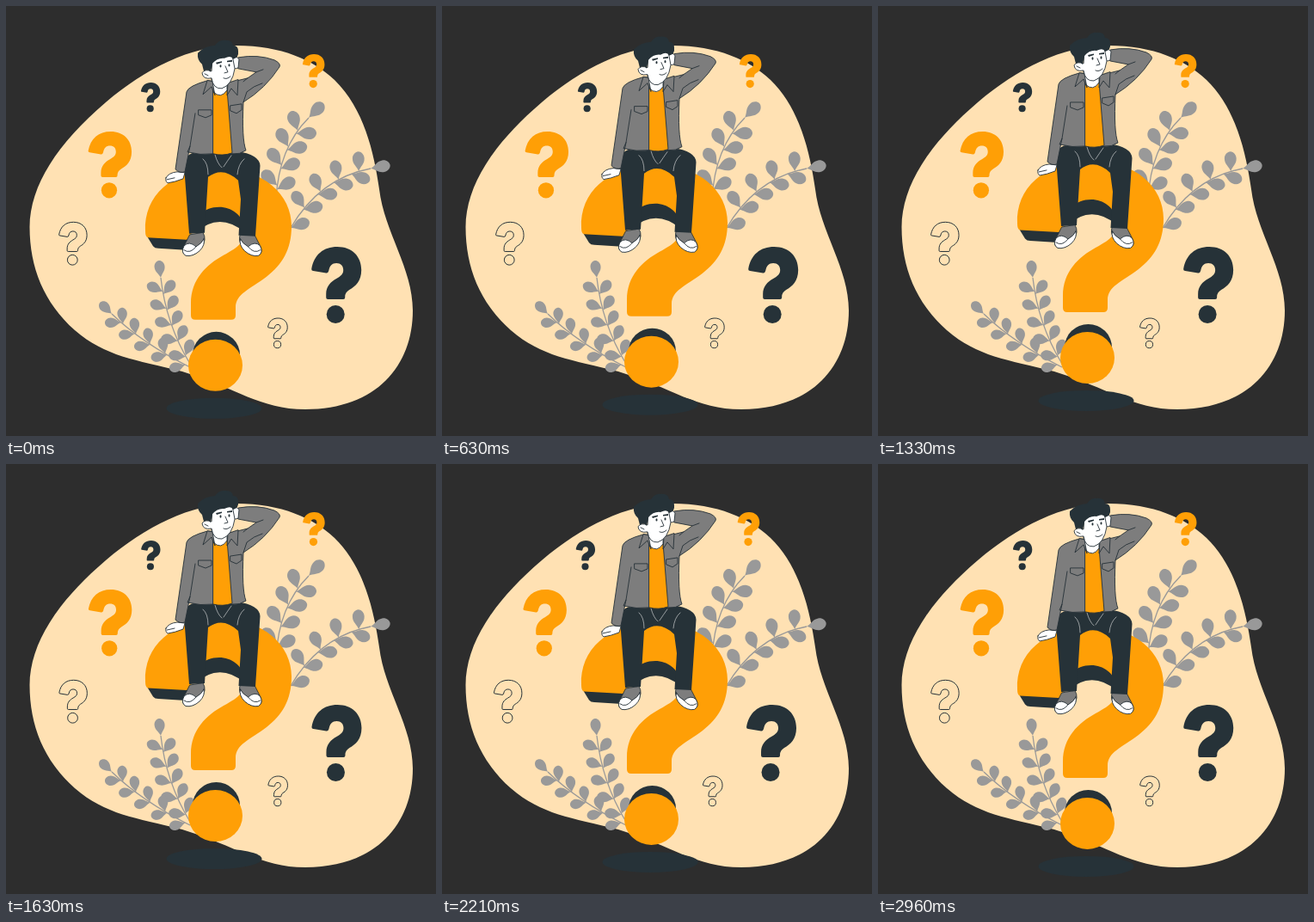
Write an HTML page that moves like this. It is 500 by 500 pixels and loops after 3 s.

```html
<!DOCTYPE html>
<html lang="en">
<head>
<meta charset="utf-8">
<title>Thinking man on a question mark</title>
<style>
  html, body { margin: 0; width: 100%; height: 100%; overflow: hidden; background: #2d2d2d; }
  svg { display: block; width: 100%; height: 100%; }
  .dark { fill: #263238; }
  .orange { fill: #ff9f06; }
  .line { fill: none; }
  .inked { stroke: #263238; stroke-width: .9; stroke-linejoin: round; stroke-linecap: round; }
  .grey { fill: #7d7d7d; }
  .white { fill: #fff; }
  .seam { fill: none; stroke: #e4e4e4; stroke-width: .6; stroke-linecap: round; }
  .outline { fill: none; stroke: #263238; stroke-width: 1; }
  #mark * { vector-effect: non-scaling-stroke; }
  #plants { fill: #999; }
  #plants .stem { fill: none; stroke: #999; stroke-width: 1.3; }
</style>
</head>
<body>
<svg viewBox="0 0 500 500">
  <defs>
    <g id="mark">
      <path d="M0 26C3 9 14 0 30 0C47 0 58 11 58 27C58 40 51 46 44 50Q39 53 39 58V59Q39 61 37 61H19Q17 61 17 59V55C17 46 22 41 29 37C34 34 37 32 37 27C37 22 34 19 29 19C24 19 21 22 20 28Q19 31 17 30.500L2 28Q0 28 0 26Z"/>
      <circle cx="28" cy="78.500" r="10.500"/>
    </g>
    <g id="shoe" class="inked">
      <path class="grey" d="M214 266L229 263.500Q234 272 227 281Q219 292 209 290Q203 287 207 279Z"/>
      <path class="white" d="M230 271Q232 278 225 285Q217 292 209 290.500Q203 287 207 279Q213 273 221 280Q228 276 230 271Z"/>
      <path class="line" d="M207 284Q214 289 221 280"/>
    </g>
  </defs>

  <path fill="#ffe1b3" d="M27.500 257C28 208 60 160 116 112C162 73 214 46 268 46C320 46 358 63 382 86C416 119 428 170 434 213C440 263 473 305 473 354C473 418 431 469 348 469C295 469 268 444 205 425C150 411 116 408 80 377C44 345 27.500 304 27.500 257Z"/>
  <g id="plants"></g>
  <g id="marks"></g>

  <g id="floating">
    <ellipse class="dark" cx="242" cy="468" rx="55.500" ry="12"/>
    <ellipse class="dark" cx="244.500" cy="406" rx="27.500" ry="27"/>
    <ellipse class="orange" cx="243.500" cy="418" rx="31.500" ry="30"/>
    <path class="dark" d="M164 268L171 279.500Q173 282 177 282L209 284L214 266ZM220 264Q248 239 277 263V225H220Z"/>
    <path class="orange" d="M162 262C160 222 192 190 247 189C300 189 332 220 332 256C332 284 321 301 303 315C283 330 267 335 267 351V360Q267 365 262 365H220Q215 365 215 360V346C215 318 233 301 253 290C272 280 279 273 277 258C275 243 262 234 248 234C229 234 218 247 216 262Q215 272 210 272L165 269.500Q162 269 162 262Z"/>

    <use href="#shoe"/>
    <use href="#shoe" transform="translate(502.500) scale(-1 1)"/>
    <path class="dark" d="M207 186Q207 172 222 170L240 167L268 169Q295 173 295.500 186L290 268L270.500 267L273 225L270 203Q252 186 235 199L231 264L213 265Z"/>
    <path class="seam" d="M243 173Q246 184 251 188M262 174Q257 181 253 187M229 178Q235 183 235 196M277 178Q270 184 269 196"/>

    <g class="inked">
      <path class="white" d="M186 200Q189 194 199 193L208 194L206 201Q196 205 188 206Q185 204 186 200ZM187 202L196 200"/>
      <path class="grey" d="M234 87Q212 93 210 100L197 190Q202 195 208 193L214 163L211 170Q226 174 241 172H263Q272 173 279 168Q274 155 276 112Q302 96 318 71Q320 67 312 63Q293 56 270 60Q263 66 270 73L291 77L281 84Q268 87 258 90Z"/>
      <path class="orange" d="M241 97L257 97L263 171Q252 175 241 172Z"/>
      <path class="white" d="M239 82L257 88L257 98Q250 109 241 100Z"/>
      <path class="grey" d="M234 87L229 103L239 94L243 104L240 88ZM258 90L257 104L262 96L269 104L270 86Z"/>
      <path class="line" d="M224 121H239V127L232 130L224 127ZM261 116L274 114V121L268 125L261 122ZM214 163L220 125M276 112L280 100Q288 93 298 90M281 84L276 88M291 77L299 74"/>
      <path class="white" d="M262 59Q268 58 271 62L270 72Q264 75 262 69Z"/>
      <path class="white" d="M240 61L239 76Q231 73 228 78Q229 86 239 84Q241 97 251 96Q263 92 266 73L263 57Z"/>
    </g>
    <path class="dark" d="M230 76Q235 73 238 77L240 67Q246 60 254 61Q262 57 264 62Q271 60 270 53Q270 46 264 46Q263 39 254 40Q248 39 243 46Q230 47 223 55Q222 63 228 68Z"/>
    <path class="dark" d="M244 66L251 64.500L251 66L245 68ZM257 64L263 63L263 65L257 65.500Z"/>
    <ellipse class="dark" cx="249.500" cy="70" rx="1" ry="1.700"/>
    <ellipse class="dark" cx="259.500" cy="69" rx="1" ry="1.700"/>
    <path class="line inked" d="M255 70L258 77L254 78M253 84Q257 86 261 82M231 79L235 81"/>
  </g>
</svg>

<script>
const PERIOD = 3000, PHASE = 25;
const byId = id => document.getElementById(id);

// Each side: first position along the stem, step, leaf count, angle from the stem
const plants = [
  { from: [314, 225], bend: [317, 165], to: [352, 130], size: 24,
    left: [.14, .22, 4, -54], right: [.1, .22, 4, 55] },
  { from: [331, 258], bend: [365, 200], to: [424, 189], size: 23,
    left: [.22, .22, 4, -75], right: [0, .2, 5, 40] },
  { from: [214, 416], bend: [186, 370], to: [180, 316], size: 20,
    left: [.09, .19, 5, -55], right: [.1, .18, 5, 50] },
  { from: [214, 420], bend: [158, 392], to: [123, 358], size: 19,
    left: [.05, .2, 5, -42], right: [.27, .185, 4, 46] }
];

function leaf([x, y], angle, size) {
  return `<path transform="translate(${x} ${y}) rotate(${angle}) scale(${size})"
    d="M0 0C.25 -.08 .35 -.3 .65 -.3C.85 -.3 1 -.14 1 0C1 .14 .85 .3 .65 .3C.35 .3 .25 .08 0 0Z"/>`;
}

function drawPlant({ from, bend, to, size, left, right }) {
  const point = t => from.map((a, i) =>
    (1 - t) ** 2 * a + 2 * t * (1 - t) * bend[i] + t * t * to[i]);
  const heading = t => {
    const [dx, dy] = from.map((a, i) => (1 - t) * (bend[i] - a) + t * (to[i] - bend[i]));
    return Math.atan2(dy, dx) * 180 / Math.PI;
  };
  let out = `<path class="stem" d="M${from}Q${bend} ${to}"/>` + leaf(to, heading(1), size);
  for (const [start, step, count, angle] of [left, right]) {
    for (let i = 0; i < count; i++) {
      const t = start + i * step;
      out += leaf(point(t), heading(t) + angle, size);
    }
  }
  return out;
}

const marks = [
  ['dark', 355.3, 280, 1],
  ['orange', 95.7, 146, .87],
  ['dark', 157, 89, .385],
  ['orange', 345, 56, .44],
  ['outline', 61.7, 251.3, .56],
  ['outline', 304.7, 363, .39]
];

byId('plants').innerHTML = plants.map(drawPlant).join('');
byId('marks').innerHTML = marks.map(([look, x, y, scale]) =>
  `<g class="${look}" transform="translate(${x} ${y}) scale(${scale})"><use href="#mark"/></g>`).join('');

// Horizontal offsets at every tenth of the loop
const shake = [0, -1, 2, -4, 4, -4, 4, -4, 2, -1, 0];

function render(time) {
  const p = (time + PHASE) % PERIOD / PERIOD;
  const i = Math.floor(p * 10);
  const dx = shake[i] + (shake[i + 1] - shake[i]) * (p * 10 - i);
  const dy = -10 * (1 - Math.abs(2 * p - 1));
  byId('marks').setAttribute('transform', `translate(${dx} 0)`);
  byId('floating').setAttribute('transform', `translate(0 ${dy})`);
}

function tick() {
  render(performance.now());
  requestAnimationFrame(tick);
}
tick();
</script>
</body>
</html>
```
